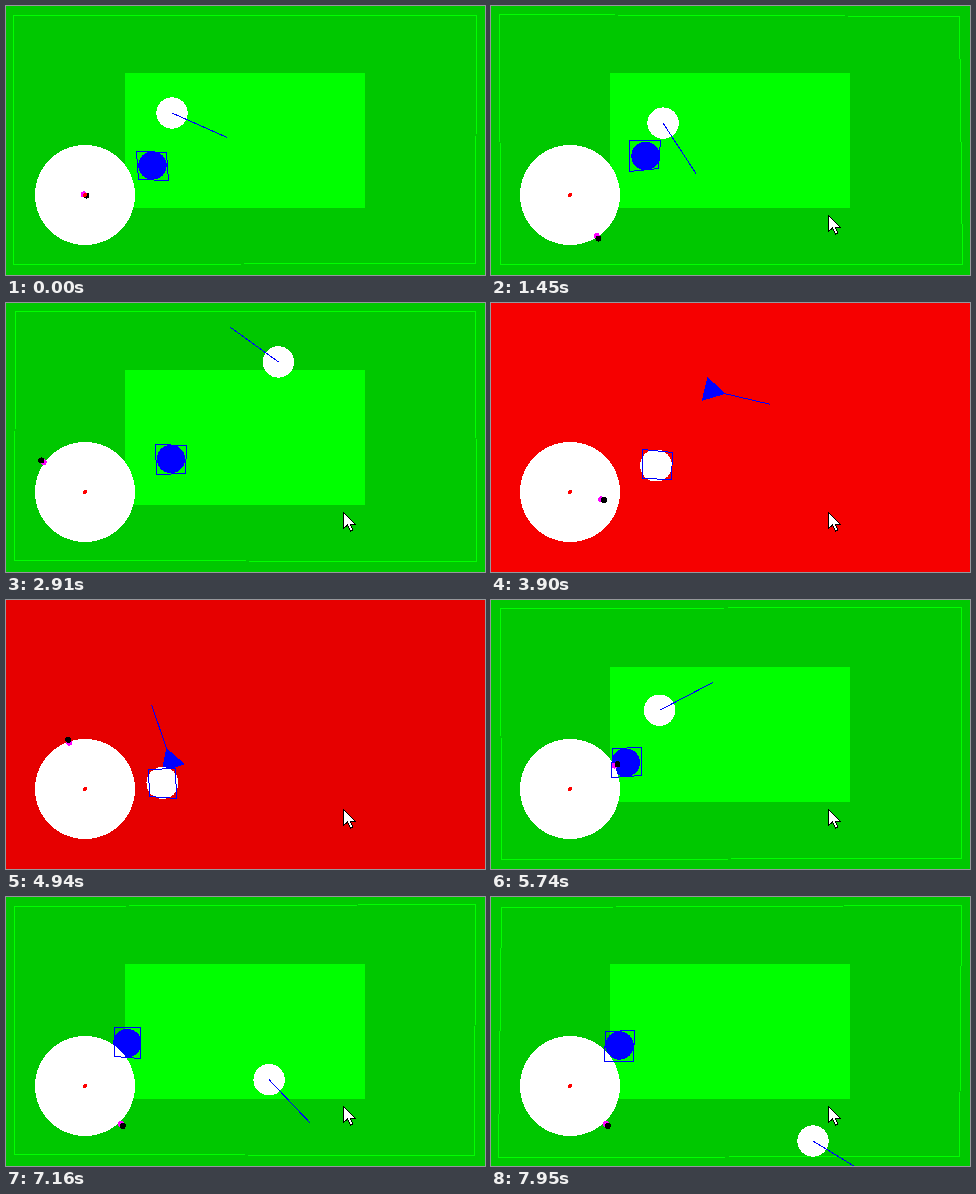
Recreate the animation shown at these times as an HTML page. Size 479 px wide and 269 px high, loop 8000 ms.

```html
<!DOCTYPE html>
<html lang="en">
<head>
<meta charset="utf-8">
<title>Joystick arena</title>
<style>
  html, body { margin: 0; width: 100%; height: 100%; overflow: hidden; background: #00c800; }
  svg { display: block; width: 100vw; height: 100vh; }
</style>
</head>
<body>
<svg viewBox="0 0 479 269" shape-rendering="crispEdges">
  <rect id="ground" width="479" height="269"/>
  <g id="field">
    <rect x="119" y="67" width="240" height="135" fill="#0f0"/>
    <polygon id="border" fill="none" stroke="#0f0"/>
  </g>
  <circle id="ball" r="15.7" fill="#fff"/>
  <polygon id="ship" points="14.3,0 -7.2,-12.4 -7.2,12.4" fill="#00f"/>
  <line id="heading" stroke="#00f"/>
  <circle id="target"/>
  <circle cx="79" cy="189" r="50" fill="#fff"/>
  <polygon id="frame" fill="none" stroke="#00f"/>
  <circle id="stick" r="3" fill="#f0f"/>
  <circle id="knob" r="3"/>
  <circle cx="79" cy="189" r="2" fill="#f00"/>
  <path id="pointer" d="M337.5 209.5v16l4-3.5 3 6 2.5-1.2-3-5.8h5z" fill="#fff" stroke="#000"/>
</svg>
<script>
const LOOP = 8000, STEP = 37;
const RED_START = 3780, RED_END = 5400, POINTER_START = 400;
const HUB = { x: 79, y: 189 };
const SPEED = 0.002;   // player px per ms for each px of stick reach
const FLOOR = 259;

// Stick angle (degrees) and reach steer the player through these poses.
const poses = [
  { t: 0,    x: 166,   y: 107,   angle: 24,   reach: 1.5, tx: 146.5, ty: 159.5 },
  { t: 1300, x: 166,   y: 107,   angle: 24,   reach: 1.5, tx: 153.5, ty: 151 },
  { t: 1450, x: 172,   y: 117,   angle: 57,   reach: 52,  tx: 154.5, ty: 150 },
  { t: 2910, x: 272.5, y: 59,    angle: -144, reach: 54,  tx: 165,   ty: 156 },
  { t: 3900, x: 220.5, y: 87.5,  angle: -347, reach: 35,  tx: 165,   ty: 162.5 },
  { t: 4940, x: 165,   y: 161.5, angle: -109, reach: 52,  tx: 156.5, ty: 183 },
  { t: 6470, x: 211.5, y: 129,   angle: 46.5, reach: 55,  tx: 115,   ty: 144 },
  { t: 7950, x: 322,   y: 244,   angle: 46.5, reach: 55,  tx: 128.5, ty: 148.5 }
];

const $ = id => document.getElementById(id);
const set = (id, attrs) => {
  for (const name in attrs) $(id).setAttribute(name, attrs[name]);
};
const show = (id, visible) => set(id, { visibility: visible ? "visible" : "hidden" });
const place = (id, x, y) => set(id, { cx: x, cy: y });
const clamp = v => Math.max(0, Math.min(1, v));
const lerp = (a, b, p) => a + (b - a) * p;
const radians = degrees => degrees * Math.PI / 180;

function hermite(a, b, va, vb, p) {
  const q = 1 - p;
  return q * q * ((1 + 2 * p) * a + p * va) + p * p * ((1 + 2 * q) * b - q * vb);
}

function poseAt(t) {
  const i = Math.max(1, poses.findIndex(pose => pose.t >= t));
  const b = t > LOOP - 50 ? poses.at(-1) : poses[i];
  const a = poses[poses.indexOf(b) - 1];
  const span = b.t - a.t, p = clamp((t - a.t) / span);
  const push = (pose, trig) => trig(radians(pose.angle)) * pose.reach * SPEED * span;
  return {
    x: hermite(a.x, b.x, push(a, Math.cos), push(b, Math.cos), p),
    y: hermite(a.y, b.y, push(a, Math.sin), push(b, Math.sin), p),
    angle: radians(lerp(a.angle, b.angle, p)),
    reach: lerp(a.reach, b.reach, p),
    tx: lerp(a.tx, b.tx, p),
    ty: lerp(a.ty, b.ty, p)
  };
}

function jitter(seed) {
  const s = Math.sin(seed * 127.1 + 3.7) * 43758.5453;
  return (s - Math.floor(s) - 0.5) * 3.4;
}

// Rectangle whose corners shake once per step.
function shakyBox(cx, cy, halfW, halfH, seed) {
  return [[-1, -1], [1, -1], [1, 1], [-1, 1]].map(([sx, sy], i) => {
    const x = cx + sx * halfW + jitter(seed + i * 2);
    const y = cy + sy * halfH + jitter(seed + i * 2 + 1);
    return `${Math.floor(x) + 0.5},${Math.floor(y) + 0.5}`;
  }).join(" ");
}

function draw(t) {
  const { x, y, angle, reach, tx, ty } = poseAt(t);
  const red = t >= RED_START && t < RED_END;
  const level = Math.round(lerp(255, 230, clamp((t - RED_START) / 330)));
  const seed = Math.floor(t / STEP) * 16;

  set("ground", { fill: red ? `rgb(${level},0,0)` : "#00c800" });
  show("field", !red);
  set("border", { points: shakyBox(239.5, 134, 230.5, 125, seed) });

  place("target", tx, ty);
  set("target", { r: red ? 16 : 14.2, fill: red ? "#fff" : "#00f" });
  set("frame", { points: shakyBox(tx, ty, 14.5, 14.5, seed + 8) });

  place("ball", x, y);
  show("ball", !red);
  show("ship", red);
  set("ship", { transform: `translate(${x} ${y}) rotate(${angle * 180 / Math.PI})` });

  // Scraping along the floor flattens the heading.
  const slope = y + 15.7 > FLOOR ? 0.58 : 1;
  const aim = Math.atan2(Math.sin(angle) * slope, Math.cos(angle));
  set("heading", { x1: x, y1: y, x2: x + 60 * Math.cos(aim), y2: y + 60 * Math.sin(aim) });

  const onStick = (id, r) =>
    place(id, HUB.x + r * Math.cos(angle), HUB.y + r * Math.sin(angle));
  onStick("stick", reach - 3);
  onStick("knob", reach);
  show("pointer", t >= POINTER_START);
}

const start = performance.now();
function tick() {
  draw((performance.now() - start) % LOOP);
  requestAnimationFrame(tick);
}
tick();
</script>
</body>
</html>
```
